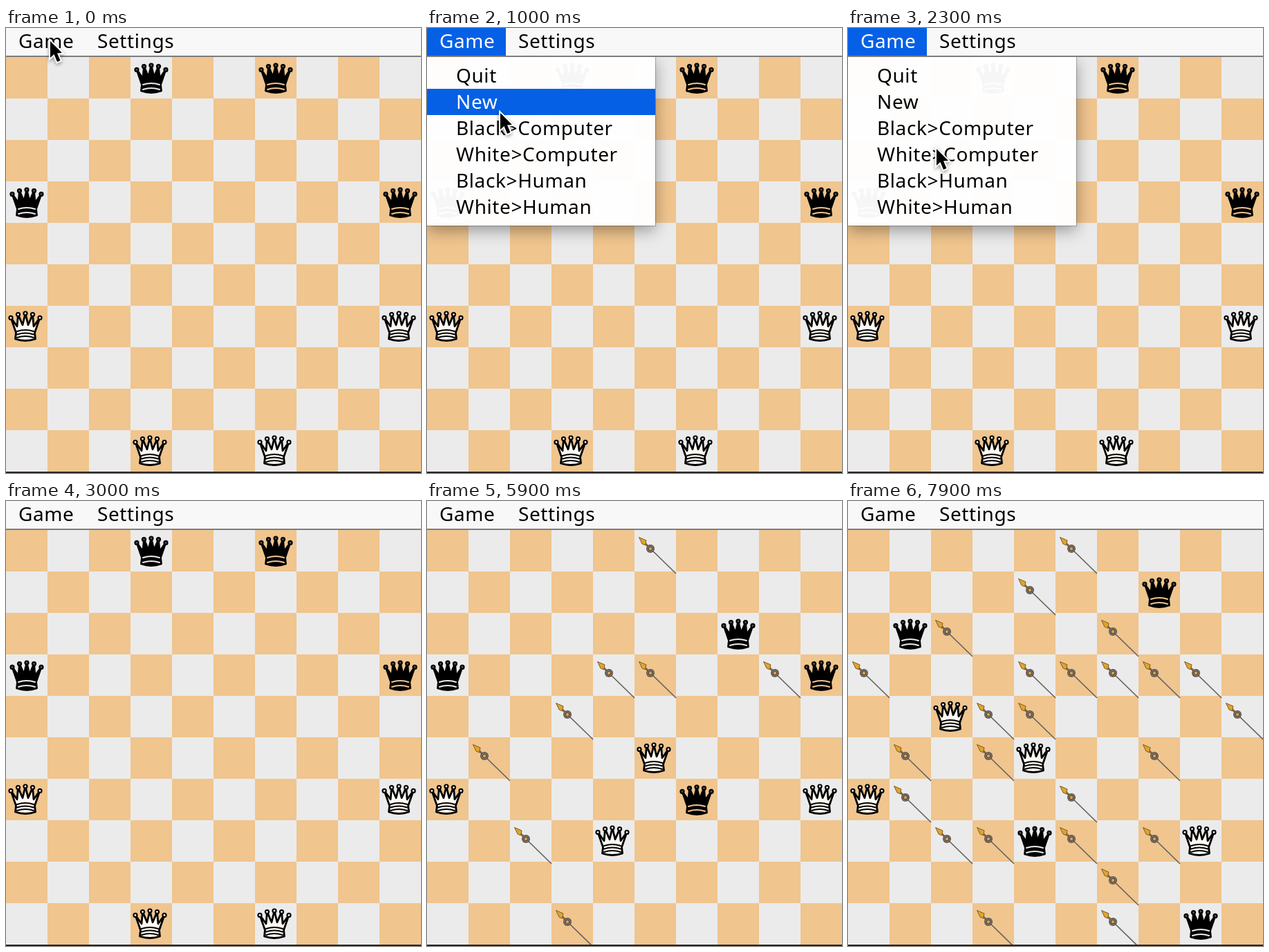
An HTML page with a canvas for the animation above (8000 ms loop, 600 by 644 pixels).

```html
<!DOCTYPE html>
<html lang="en">
<head>
<meta charset="utf-8">
<title>Queens and arrows</title>
<style>
  html, body { margin: 0; width: 100%; height: 100%; overflow: hidden; background: #f8f8f8; }
  canvas { display: block; width: 600px; height: 644px; }
</style>
</head>
<body>
<canvas id="stage" width="600" height="644"></canvas>
<script>
const ctx = document.getElementById('stage').getContext('2d');
const LOOP = 8000, STEP = 100, SIZE = 10, CELL = 60, TOP = 42;
const LIGHT = '#ebebeb', TAN = '#f0c58e', BLUE = '#0560e6';

const BLACK_START = 'd10 g10 a7 j7'.split(' ');
const WHITE_START = 'a4 j4 d1 g1'.split(' ');
// Game record in the usual notation: from-to/arrow, white begins.
const GAME = `
  d1-d7/i7 g10-g4/d1 g1-b6/f10 d10-f8/d6 d7-f5/b5 f8-g8/f7 b6-e3/e7 g8-h8/c3
  j4-i3/h3 j7-i6/j6 e3-d4/d3 h8-h9/e9 f5-e5/e6 g4-g3/g2 e5-f5/h7 i6-g6/g8
  f5-f6/f3 g6-g5/h5 d4-c4/b4 g3-i1/g1 c4-c5/d5 g5-e3/f4 f6-e5/g7 a7-b8/a7
  c5-c6/c8`.trim().split(/\s+/).map(move => move.split(/[-/]/));
// Moves made by a given time: slow at first, then quick replies.
const PACE = [[4000, 1], [4500, 2], [5000, 4], [6000, 9], [7200, 23], [7800, 25]];

const MENU = ['Quit', 'New', 'Black>Computer', 'White>Computer', 'Black>Human', 'White>Human'];
const MENU_OPEN = 300, MENU_CLOSE = 2500, BLINK = 2300;
const MENU_W = 330, MENU_H = 244, ROW_TOP = 50, ROW_H = 38;
const POINTER_X = [[400, 64], [1000, 106], [1900, 128]];
const POINTER_Y = [[400, 19], [1000, 123], [1900, 175]];

function interpolate(keys, t) {
  if (t <= keys[0][0]) return keys[0][1];
  const next = keys.findIndex(key => key[0] > t);
  if (next < 0) return keys[keys.length - 1][1];
  const [t0, v0] = keys[next - 1], [t1, v1] = keys[next];
  return v0 + (v1 - v0) * (t - t0) / (t1 - t0);
}

function rect(color, x, y, w, h) {
  ctx.fillStyle = color;
  ctx.fillRect(x, y, w, h);
}

function polygon(points) {
  ctx.beginPath();
  points.forEach(([x, y]) => ctx.lineTo(x, y));
  ctx.closePath();
}

function line(color, width, x1, y1, x2, y2) {
  ctx.strokeStyle = color;
  ctx.lineWidth = width;
  ctx.beginPath();
  ctx.moveTo(x1, y1);
  ctx.lineTo(x2, y2);
  ctx.stroke();
}

function disc(color, x, y, r) {
  ctx.fillStyle = color;
  ctx.beginPath();
  ctx.arc(x, y, r, 0, 2 * Math.PI);
  ctx.fill();
}

function band(color, width, y, half) {
  ctx.strokeStyle = color;
  ctx.lineWidth = width;
  ctx.beginPath();
  ctx.moveTo(-half, y);
  ctx.quadraticCurveTo(0, y - 4, half, y);
  ctx.stroke();
}

const squareColor = (c, r) => (c + r) % 2 ? LIGHT : TAN;

function atSquare(square, draw) {
  const c = square.charCodeAt(0) - 97, r = SIZE - square.slice(1);
  ctx.save();
  ctx.translate(c * CELL, TOP + r * CELL);
  draw(squareColor(c, r));
  ctx.restore();
}

// Five spikes fan out from the middle, with their tips on a parabola.
const spikeTip = i => [i * 10.5, 12 + 1.6 * i * i];
const valley = i => [i * 8, 28.5 + i * i];

function queen(body, ball, bands) {
  ctx.lineJoin = ctx.lineCap = 'round';
  ctx.strokeStyle = '#000';
  ctx.fillStyle = body;
  ctx.lineWidth = 2.8;
  const crown = [];
  for (let i = -2; i <= 2; i++) {
    crown.push(spikeTip(i));
    if (i < 2) crown.push(valley(i + 0.5));
  }
  ctx.beginPath();
  crown.forEach(p => ctx.lineTo(...p));
  ctx.lineTo(13.5, 40);
  ctx.lineTo(14.5, 49);
  ctx.quadraticCurveTo(0, 54, -14.5, 49);
  ctx.lineTo(-13.5, 40);
  ctx.closePath();
  ctx.fill();
  ctx.stroke();
  for (let i = -2; i <= 2; i++) {
    disc('#000', ...spikeTip(i), 3.6);
    disc(ball, ...spikeTip(i), 1.4);
  }
  bands.forEach(([color, y]) => band(color, 2, y, 12));
}

function blackQueen(background) {
  ctx.translate(30, 0);
  queen('#000', '#555', [[background, 40], [background, 47]]);
}

function whiteQueen() {
  ctx.translate(28, -1);
  queen('#fffaf2', '#fff', [['#000', 38], ['#000', 42.5], ['#000', 47]]);
}

function arrow() {
  line('#66635f', 1.7, 23, 27, 60, 63);
  line('#85643a', 3, 13, 17, 22, 26);
  ctx.fillStyle = '#e2a42b';
  ctx.strokeStyle = '#765b2a';
  ctx.lineWidth = 1;
  polygon([[6.5, 10.5], [17, 15], [15.5, 22], [11, 20]]);
  ctx.fill();
  ctx.stroke();
  disc('#5b5450', 23, 27, 6);
  disc('#91847b', 23, 27, 4.5);
  disc('#54463c', 23, 27, 3.5);
  disc('#d6a348', 23, 27, 2.2);
}

function label(text, x, y, color) {
  ctx.font = '28px "Noto Sans", "Open Sans", sans-serif';
  ctx.letterSpacing = '0.6px';
  ctx.fillStyle = color;
  ctx.fillText(text, x, y);
}

function board(t) {
  for (let r = 0; r < SIZE; r++)
    for (let c = 0; c < SIZE; c++)
      rect(squareColor(c, r), c * CELL, TOP + r * CELL, CELL, CELL);

  const blacks = new Set(BLACK_START), whites = new Set(WHITE_START);
  const made = t < PACE[0][0] ? 0 : Math.floor(interpolate(PACE, t));
  const moves = GAME.slice(0, made);
  moves.forEach(([from, to], i) => {
    const side = i % 2 ? blacks : whites;
    side.delete(from);
    side.add(to);
  });
  moves.forEach(([, , target]) => atSquare(target, arrow));
  blacks.forEach(s => atSquare(s, blackQueen));
  whites.forEach(s => atSquare(s, whiteQueen));
  rect('#29231f', 0, 642, 600, 2);
}

function menuBar(open) {
  rect('#f8f8f8', 0, 0, 600, 40);
  rect('#7d7d7d', 0, 40, 600, 2);
  if (open) rect(BLUE, 0, 0, 114, 40);
  label('Game', 18, 29, open ? '#fff' : '#000');
  label('Settings', 132, 29, '#000');
}

function menuPanel(hover) {
  ctx.save();
  // Clip to the outside of the panel so its shadow does not show through it.
  ctx.beginPath();
  ctx.rect(0, TOP, 600, 602);
  ctx.rect(0, TOP, MENU_W, MENU_H);
  ctx.clip('evenodd');
  ctx.shadowColor = 'rgba(0,0,0,0.36)';
  ctx.shadowBlur = 22;
  ctx.shadowOffsetY = 7;
  rect('#fff', 0, TOP, MENU_W, MENU_H);
  ctx.shadowColor = 'transparent';
  ctx.strokeStyle = 'rgba(0,0,0,0.25)';
  ctx.lineWidth = 2;
  ctx.strokeRect(0, TOP, MENU_W, MENU_H);
  ctx.restore();
  rect('rgba(255,255,255,0.965)', 0, TOP, MENU_W, MENU_H);
  MENU.forEach((text, i) => {
    const y = ROW_TOP + i * ROW_H;
    if (i === hover) rect(BLUE, 0, y, MENU_W, ROW_H);
    label(text, 42, y + 29, i === hover ? '#fff' : '#000');
  });
}

function pointer(x, y) {
  ctx.save();
  ctx.translate(x, y);
  polygon([[0, 0], [0, 24], [5.5, 19], [10, 30], [14.5, 28], [10, 17.5], [17, 17]]);
  ctx.lineWidth = 4;
  ctx.strokeStyle = '#fff';
  ctx.shadowColor = 'rgba(0,0,0,0.4)';
  ctx.shadowBlur = 5;
  ctx.shadowOffsetY = 2;
  ctx.stroke();
  ctx.shadowColor = 'transparent';
  ctx.fillStyle = '#000';
  ctx.fill();
  ctx.restore();
}

function draw(now) {
  const t = Math.floor(now % LOOP / STEP) * STEP;
  const open = t >= MENU_OPEN && t < MENU_CLOSE;
  const x = interpolate(POINTER_X, t), y = interpolate(POINTER_Y, t);
  const hover = t === BLINK ? -1 : Math.floor((y - ROW_TOP) / ROW_H);
  board(t);
  menuBar(open);
  if (open) menuPanel(hover);
  if (t < MENU_CLOSE) pointer(x, y);
}

const start = performance.now();
function tick() {
  draw(performance.now() - start);
  requestAnimationFrame(tick);
}
tick();
</script>
</body>
</html>
```
